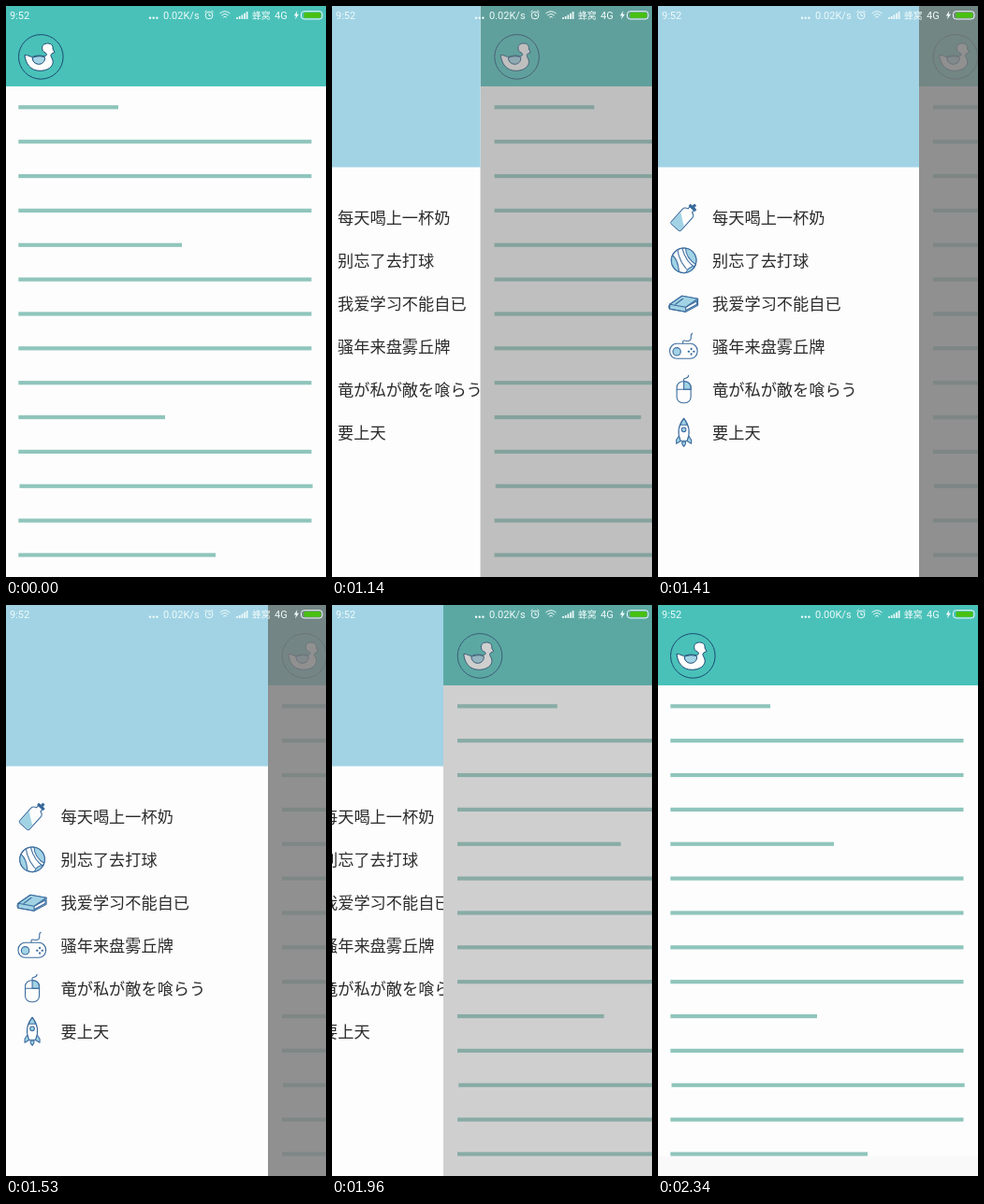
Recreate the animation shown at these times as an HTML page. Size 342 by 611 pixels, loop 2.62 s.

```html
<!DOCTYPE html>
<html lang="zh-CN">
<head>
<meta charset="utf-8">
<style>
html, body { margin: 0; width: 342px; height: 611px; overflow: hidden; }
svg { display: block; }
.menu text { font: 17.2px "Noto Sans CJK SC", "Noto Sans CJK JP", "Noto Sans CJK", sans-serif; fill: #2b2b2b; }
.status text { font: 11px Roboto, "Noto Sans CJK SC", sans-serif; fill: #effaf9; }
.status .carrier { font-size: 9.8px; }
.icon { fill: #fdfdfd; stroke: #3d6d9f; stroke-width: 1.1; stroke-linejoin: round; stroke-linecap: round; }
.icon .blue { fill: #a1d3e5; }
.icon .open { fill: none; }
.icon .solid { fill: #2d5f95; }
</style>
</head>
<body>
<svg width="342" height="611" viewBox="0 0 342 611">
  <defs>
    <clipPath id="drawerClip"><rect id="drawerWindow" width="0" height="611"/></clipPath>
    <clipPath id="ballClip"><circle r="13.3"/></clipPath>
  </defs>

  <rect width="342" height="611" fill="#fdfdfd"/>
  <g id="page">
    <rect x="-2" width="346" height="86" fill="#49c1b9"/>
    <g id="lines" fill="#8fc5bc"></g>
    <g stroke="#1b4a72" stroke-width="1" stroke-linejoin="round">
      <circle cx="37.3" cy="54.4" r="23.8" fill="none"/>
      <path fill="#fdfdfd" d="M39 47C37.5 42 41 40 44.5 40C49 40 50.5 43 50 46L52 49.500L49 51C46.500 53 49 55 50 58C51.500 65 44 69.500 36 69.300C26 69 21 62 20 52.500C24 52 26 55.500 30 54C34 52.500 38 53 41 54C44 53 44 51 42 50C40 49 39 48 39 47Z"/>
      <path fill="#a1d3e5" d="M28 55.500C32 53.500 38 53 41.500 55C42 60 38 62.500 34.500 62.300C30.500 62 28.500 59 28 55.500Z"/>
    </g>
  </g>
  <rect id="shade" width="342" height="611" fill="#7b7b7b"/>
  <rect id="bottomStrip" y="590" width="342" height="21" fill="#f9f9f9"/>

  <g clip-path="url(#drawerClip)">
    <rect id="drawer" width="342" height="611"/>
    <rect width="342" height="172.5" fill="#a1d3e5"/>
    <g id="menu" class="menu"></g>
  </g>

  <g class="status">
    <text x="4" y="14">9:52</text>
    <g fill="#effaf9"><circle cx="154" cy="12.800" r="1.200"/><circle cx="157.700" cy="12.800" r="1.200"/><circle cx="161.400" cy="12.800" r="1.200"/></g>
    <text id="speed" x="168" y="14"></text>
    <g fill="none" stroke="#effaf9" stroke-width="1">
      <circle cx="217" cy="10" r="3.900"/>
      <path d="M217 7.700V10.300H219M212.500 6.500L214.500 4.800M221.500 6.500L219.500 4.800"/>
      <path d="M228.500 8Q234 3.500 239.500 8M230.300 10.200Q234 7 237.700 10.200M232.200 12.200Q234 10.600 235.800 12.200"/>
      <path stroke-width="1.700" d="M247 14V12M249.700 14V11M252.400 14V9.500M255.100 14V7.800M257.600 14V6"/>
    </g>
    <text class="carrier" x="263" y="13.500">蜂窝</text>
    <text x="287" y="14">4G</text>
    <path d="M311.300 5L307.800 10.500H310L309 14.500L313 8.800H310.700Z" fill="#effaf9"/>
    <rect x="315.500" y="5.700" width="22.500" height="8.300" rx="3" fill="none" stroke="#effaf9"/>
    <rect x="318.500" y="7" width="18" height="5.800" rx="1.500" fill="#48c010"/>
  </g>
</svg>
<script>
const byId = id => document.getElementById(id);
const LOOP = 2620, OPEN = 280;

const shortEnds = { 0: 120, 4: 188, 9: 170, 13: 224 };
byId('lines').innerHTML = Array.from({ length: 14 }, (_, i) => {
  const x = i === 11 ? 14.5 : 13.3;
  const width = (shortEnds[i] || 326.5) - 13.3;
  return `<rect x="${x}" y="${106.2 + i * 36.86}" width="${width}" height="4.2"/>`;
}).join('');

const items = [
  ['每天喝上一杯奶', `<g transform="rotate(42)">
    <path d="M-7 -6Q-7 -9 -3 -10V-13H3V-10Q7 -9 7 -6V12Q7 14 5 14H-5Q-7 14 -7 12Z"/>
    <path class="blue" stroke="none" d="M-6.400 -2L6.400 7V13.400H-6.400Z"/>
    <path class="solid" d="M-4 -15H4V-13H-4ZM-1 -18H1V-15H-1Z"/></g>`],
  ['别忘了去打球', `<circle r="13.300"/>
    <g clip-path="url(#ballClip)"><path class="blue" d="M2 -15Q1 -3 14 5V-15ZM-15 -7Q-6 -4 -5 14H-15Z"/>
    <path class="open" d="M-7 -13Q-5 4 8 14M-2 -14Q2 2 13 8"/>
    <path class="blue" d="M2 14Q4 6 14 6V14Z"/></g><circle class="open" r="13.300"/>`],
  ['我爱学习不能自已', `<path class="blue" d="M-15 1L-2 -8L15 -5V2L2 9L-15 6Z"/>
    <path d="M2 4L14 -2.500V1L2 7.500Z"/>
    <path class="blue" d="M-15 1L-2 -8L15 -5L2 4Z"/>
    <path class="open" d="M-15 1Q-17 4 -15 6L2 9M-9 1L-1 -5"/>`],
  ['骚年来盘雾丘牌', `<path class="open" d="M-1 -3C-2 -10 4 -3 7 -7C9 -10 6 -12 9 -14"/>
    <rect x="-15" y="-3" width="29.500" height="16" rx="7.500"/>
    <circle class="blue" cx="-7.500" cy="5.500" r="4.200"/>
    <path d="M8 2.500V3M8 8V8.500M5 5.500H5.500M10.500 5.500H11" stroke-width="2"/>`],
  ['竜が私が敵を喰らう', `<path class="open" d="M0 -9C-1 -14 5 -10 5 -15"/>
    <rect x="-7.500" y="-8.500" width="15" height="23" rx="6.500"/>
    <path class="blue" d="M0 -8.500Q7.500 -8.500 7.500 -1V0H0Z"/>
    <path class="open" d="M-7.500 0H7.500"/>`],
  ['要上天', `<path class="blue" d="M-4 2L-8 8V12L-3 9ZM4 2L8 8V12L3 9Z"/>
    <path d="M0 -15Q-9 -4 -3.500 9H3.500Q9 -4 0 -15Z"/>
    <path class="blue" d="M0 -15Q-3 -11 -3.700 -8H3.700Q3 -11 0 -15Z"/>
    <circle class="blue" cy="-3" r="2.300"/>
    <path class="blue" d="M-2 10H2Q2.500 12 0 15Q-2.500 12 -2 10Z"/>`]
];
byId('menu').innerHTML = items.map(([label, icon], i) =>
  `<g transform="translate(0 ${226.3 + i * 46})"><text y="6.200">${label}</text>
   <g class="icon" transform="translate(-30.500 0)">${icon}</g></g>`).join('');

// The first step of each slide is held longer than the rest.
const stepped = (t, first, second) =>
  t < second ? first : second + Math.floor((t - second) / 30) * 30;

const remaining = (t, end, duration) =>
  OPEN * Math.min(1, Math.max(0, (end - t) / duration)) ** 4;

function drawerEdge(t) {
  if (t < 1060 || t >= 2340) return 0;
  if (t < 1840) return OPEN - remaining(stepped(t, 1060, 1110), 1530, 480.6);
  return remaining(stepped(t, 1840, 1900), 2478, 641.5);
}

function draw(t) {
  const edge = drawerEdge(t);
  const ended = t >= 2340;
  byId('page').setAttribute('transform', `translate(${edge && edge + 1.7} 0)`);
  byId('shade').setAttribute('opacity', edge * 0.003);
  byId('drawerWindow').setAttribute('width', edge);
  byId('drawer').setAttribute('fill', t < 1110 ? '#f6f6f8' : '#fdfdfd');
  byId('menu').setAttribute('transform', `translate(${58 + 0.432 * (edge - 278.7)} 0)`);
  byId('bottomStrip').setAttribute('visibility', ended ? 'visible' : 'hidden');
  byId('speed').textContent = ended ? '0.00K/s' : '0.02K/s';
}

const start = performance.now();
function tick() {
  draw((performance.now() - start) % LOOP);
  requestAnimationFrame(tick);
}
tick();
</script>
</body>
</html>
```
